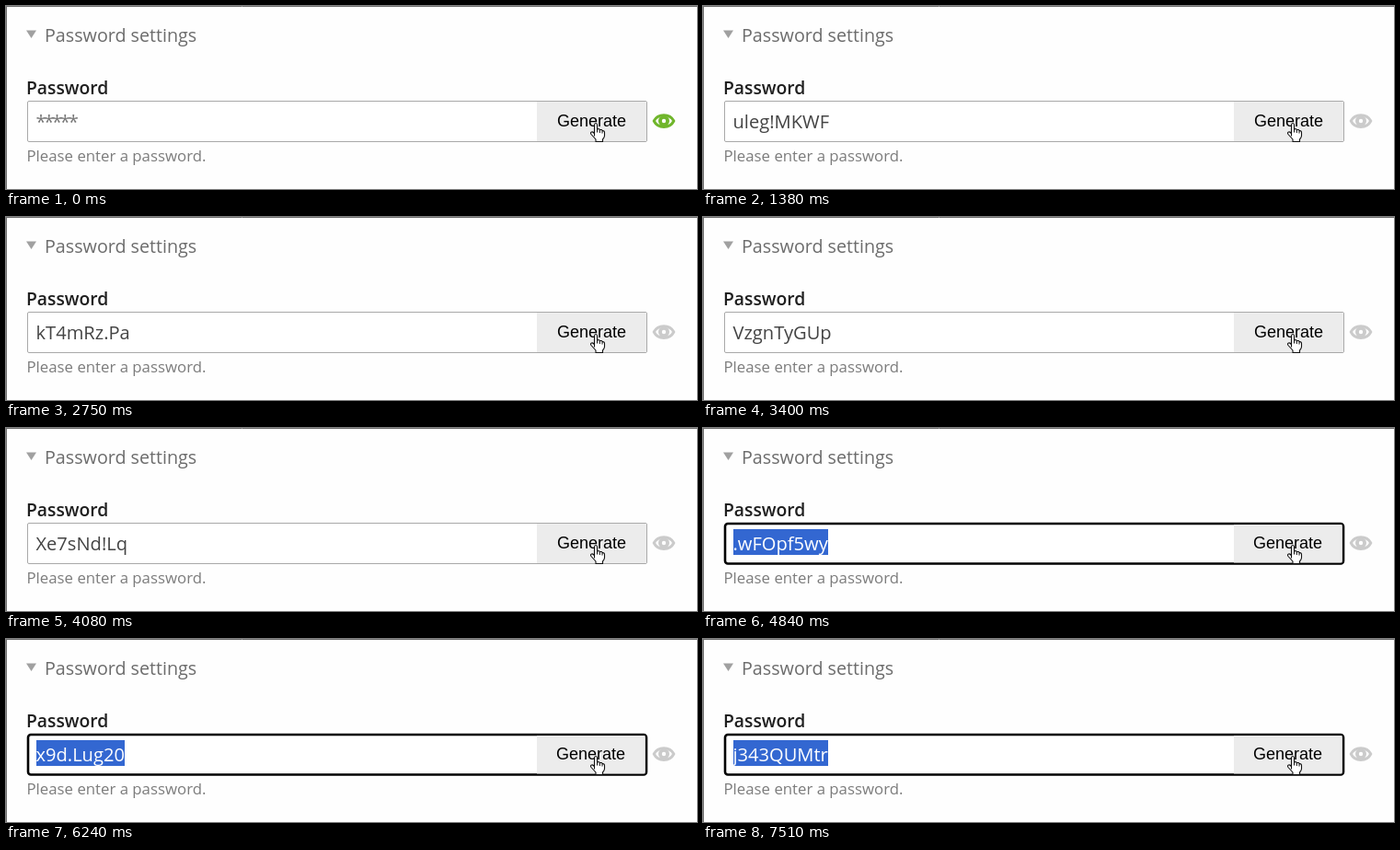
Write an HTML page that moves like this. It is 751 by 199 pixels and loops after 8 s.

```html
<!DOCTYPE html>
<html lang="en">
<head>
<meta charset="utf-8">
<title>Password settings</title>
<style>
  html, body { margin: 0; width: 100%; height: 100%; overflow: hidden; background: #fefefe; }
  svg { display: block; width: 751px; height: 199px; }
  text { font-family: "Open Sans", "Noto Sans", sans-serif; white-space: pre; }
  .title { font-size: 19.7px; fill: #6c6c6c; }
  .label { font-size: 19.3px; font-weight: 600; fill: #1f1f1f; }
  .hint { font-size: 16.8px; fill: #7c7c7c; }
  .value { font-size: 20.1px; fill: #444; }
  .value.empty { fill: #777; letter-spacing: -2.3px; }
  .value.selected { fill: #fff; }
  .button { font: 18px "Liberation Sans", Arial, sans-serif; fill: #000; }
</style>
</head>
<body>
<svg viewBox="0 0 751 199">
  <rect width="751" height="199" fill="#fefefe"/>
  <path d="M0 .5H751M.5 0V199" stroke="#707070" fill="none"/>
  <path d="M22 26.5H33L27.5 35Z" fill="#a0a0a0"/>
  <text class="title" x="42" y="39">Password settings</text>
  <text class="label" x="22" y="96">Password</text>
  <text class="hint" x="22.5" y="169">Please enter a password.</text>

  <g id="idle">
    <rect x="23.5" y="103.5" width="673" height="44" rx="1.5" fill="#fff" stroke="#a9a9a9"/>
    <rect x="577" y="104" width="119" height="43" fill="#ececec"/>
  </g>
  <g id="focus">
    <rect x="24" y="104" width="672" height="43.5" rx="3" fill="#fff" stroke="#000" stroke-width="2.6"/>
    <rect x="577" y="105" width="117.5" height="41.5" fill="#ececec"/>
  </g>

  <rect id="mark" x="33" y="110" height="28" fill="#3367d1"/>
  <text id="value" class="value" x="32.5" y="133"></text>
  <text id="button" class="button" y="131">Generate</text>

  <g id="eye">
    <path d="M704.2 125C708.5 116.5 721.5 116.5 725.8 125C721.5 133.5 708.5 133.5 704.2 125Z"
          fill="#fefefe" stroke="currentColor" stroke-width="3" stroke-linejoin="round"/>
    <circle cx="715" cy="125" r="6" fill="currentColor"/>
    <circle cx="715" cy="125" r="2.2" fill="#fefefe"/>
  </g>

  <path d="M639.5 141V129.500Q639.5 127.500 641 127.500T642.5 129.500V134
           Q645 133 645.3 134.700Q647.600 134 648 135.700Q650.500 135.300 650.500 137.500V141
           Q650.500 143 648.500 145V147.500H641V145L636 139.500Q634.800 137.500 636.500 137T639.5 139Z"
        fill="#fff" stroke="#111" stroke-width="1.1" stroke-linejoin="round"/>
  <path d="M642.5 134V137.500M645.300 135V138M648 136V138.500" stroke="#111" fill="none"/>
</svg>
<script>
  const LOOP = 8000;
  // press time, release time, password made on release
  const clicks = [
    [770, 800, "uleg!MKWF"],
    [1380, 1440, "H!COWe0h9"],
    [2070, 2130, "kT4mRz.Pa"],
    [2750, 2810, "VzgnTyGUp"],
    [3400, 3490, "Xe7sNd!Lq"],
    [4080, 4200, "b2HuKfW9o"],
    [4750, 4840, ".wFOpf5wy"],
    [5430, 5520, "Gn6tYcR!e"],
    [6140, 6240, "x9d.Lug20"],
    [6760, 6840, "S5hvAkM3u"],
    [7430, 7510, "j343QUMtr"]
  ];

  const el = id => document.getElementById(id);
  const idle = el("idle"), focus = el("focus"), mark = el("mark");
  const value = el("value"), button = el("button"), eye = el("eye");
  const show = (node, on) => node.setAttribute("visibility", on ? "visible" : "hidden");

  function stateAt(t) {
    const done = clicks.filter(c => t >= c[1]);
    const pressed = clicks.some(c => t >= c[0] && t < c[1]);
    const last = done[done.length - 1];
    return {
      text: last ? last[2] : "*****",
      empty: !last,
      focused: !!last && !pressed,
      green: t < clicks[0][0]
    };
  }

  let shown = "";
  function render(t) {
    const s = stateAt(t);
    const key = JSON.stringify(s);
    if (key === shown) return;
    shown = key;
    show(idle, !s.focused);
    show(focus, s.focused);
    show(mark, s.focused);
    value.textContent = s.text;
    value.setAttribute("class", "value" + (s.empty ? " empty" : s.focused ? " selected" : ""));
    mark.setAttribute("width", Math.floor(value.getComputedTextLength()));
    button.setAttribute("x", s.focused ? 598 : 599);
    eye.setAttribute("color", s.green ? "#70b62c" : "#cbcbcb");
  }

  const start = performance.now();
  function tick() {
    render((performance.now() - start) % LOOP);
    requestAnimationFrame(tick);
  }
  render(0);
  requestAnimationFrame(tick);
</script>
</body>
</html>
```
